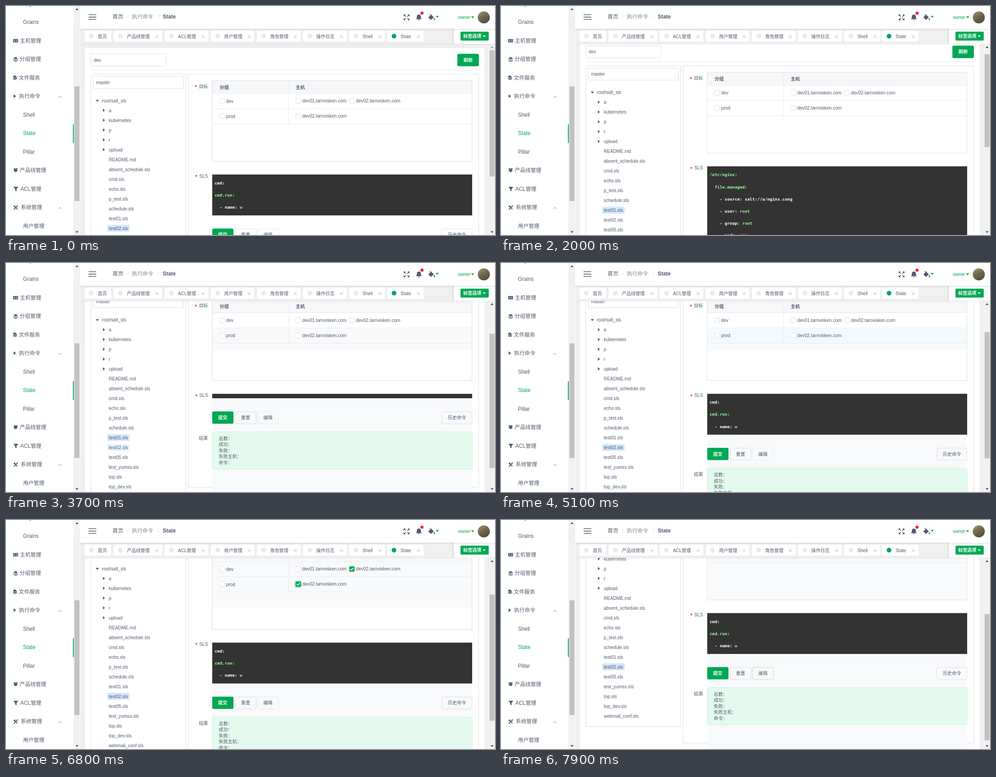
An HTML page for the animation above (8 s loop, 1092 px wide and 513 px high).

```html
<!DOCTYPE html>
<html lang="zh">
<head>
<meta charset="utf-8">
<style>
  html, body { margin: 0; width: 100%; height: 100%; overflow: hidden; background: #fff; }
  svg { display: block; }
  text { font: 10.2px "Liberation Sans", "Noto Sans CJK SC", "Noto Sans CJK", sans-serif; fill: #515a6e; white-space: pre; }
  .big { font-size: 11.9px; }
  .bold { font-weight: bold; }
  .code { font: bold 9.3px "DejaVu Sans Mono", monospace; }
</style>
</head>
<body>
<svg id="stage" width="1092" height="513">
  <defs>
    <linearGradient id="photo" x2=".6" y2="1">
      <stop offset="0" stop-color="#a39c80"/><stop offset=".5" stop-color="#746a4a"/><stop offset="1" stop-color="#4c5044"/>
    </linearGradient>
  </defs>
</svg>
<script>
const GREEN = '#00a854', INK = '#515a6e', LINE = '#dcdee2', SOFT = '#e8eaec', TINT = '#f8f9fb';
const LOOP = 8000, TICK = 100, VIEW_TOP = 85, VIEW_H = 428, EDITOR_TOP = 377.5, LINE_H = 27.2;

const set = (e, attrs) => { for (const k in attrs) e.setAttribute(k, attrs[k]); return e; };
const add = (parent, tag, attrs = {}) =>
  parent.appendChild(set(document.createElementNS('http://www.w3.org/2000/svg', tag), attrs));
const rect = (g, x, y, width, height, fill, more) => add(g, 'rect', { x, y, width, height, fill, ...more });
const frame = (g, x, y, w, h, fill = 'none', stroke = LINE, rx = 3, more) =>
  rect(g, x + .5, y + .5, w - 1, h - 1, fill, { stroke, rx, ...more });
const path = (g, d, fill = INK, more) => add(g, 'path', { d, fill, ...more });
const stroke = (g, d, color = INK, width = 1) => path(g, d, 'none', { stroke: color, 'stroke-width': width });
const circle = (g, cx, cy, r, fill) => add(g, 'circle', { cx, cy, r, fill });
// y is the vertical middle of the text
const text = (g, x, y, str, cls = '', fill, anchor = 'start') => {
  const e = add(g, 'text', { x, y: y + (cls.includes('big') ? 4.2 : 3.7), class: cls, 'text-anchor': anchor });
  if (fill) e.style.fill = fill;
  e.textContent = str;
  return e;
};
const caret = (g, x, y, fill, s = 3.5) => path(g, `M${x - s} ${y - s / 2}h${2 * s}l${-s} ${s * 1.2}z`, fill);
const show = (e, on) => e.setAttribute('display', on ? 'inline' : 'none');

const stage = document.getElementById('stage');
rect(stage, 0, 0, 1092, 513, '#f0f0f0');

// ---- scrolling pane
const port = add(stage, 'svg', { x: 166, y: VIEW_TOP, width: 912, height: VIEW_H, viewBox: `166 ${VIEW_TOP} 912 ${VIEW_H}` });
const pane = add(port, 'g');
const page = frame(pane, 175, 93, 895, 600, '#fff', SOFT);
frame(pane, 189, 107, 169, 28, '#fff');
text(pane, 196, 121, 'dev');
rect(pane, 1008, 107, 48, 28, GREEN, { rx: 3 });
text(pane, 1032, 121, '刷新', 'bold', '#fff', 'middle');
rect(pane, 189, 143, 867, 1, SOFT);
frame(pane, 189, 152, 213, 480);
const card = frame(pane, 406, 152, 650, 500);
frame(pane, 194, 157, 203, 28, '#fff');
text(pane, 201, 171, 'master');

// file tree
const hoverBox = rect(pane, 226, 0, 0, 15.5, '#eaf4fe', { rx: 2 });
const selBox = rect(pane, 226, 0, 0, 15.5, '#d5e8fc', { rx: 2 });
caret(pane, 204, 212, INK, 3.7);
text(pane, 214, 212, 'root/salt_sls');
const rows = {};
['a', 'kubernetes', 'p', 'r', 'upload', 'README.md', 'absent_schedule.sls', 'cmd.sls', 'echo.sls', 'p_test.sls',
  'schedule.sls', 'test01.sls', 'test02.sls', 'test05.sls', 'test_yumss.sls', 'top.sls', 'top_dev.sls', 'webmail_conf.sls'
].forEach((name, i) => {
  const y = 234 + i * 22;
  if (i < 5) path(pane, `M216.5 ${y - 4}v7.4l4.4-3.7z`);
  rows[name] = { y, label: text(pane, 229.5, y, name) };
});
const mark = (box, name) => {
  show(box, name);
  if (name) set(box, { y: rows[name].y - 8, width: rows[name].label.getComputedTextLength() + 7 });
};

// target table
const label = (g, y, str, starX) => {
  text(g, 451, y, str, '', INK, 'end');
  if (starX) text(g, starX, y + 2, '*', 'big bold', '#ed4014', 'middle');
};
label(pane, 180, '目标', 424);
rect(pane, 461, 167, 580, 29, '#f5f7f9');
const tableTint = rect(pane, 461, 230, 580, 0, TINT);
const rowHover = rect(pane, 461, 230, 580, 34, '#f3faff');
frame(pane, 460, 166.5, 581, 182, 'none', LINE, 0);
for (const y of [195.5, 229.5, 263.5]) rect(pane, 461, y, 580, 1, SOFT);
rect(pane, 630.5, 167, 1, 97, SOFT);
text(pane, 477, 182, '分组', 'bold');
text(pane, 647, 182, '主机', 'bold');
const checkbox = (x, y, str) => {
  frame(pane, x, y - 6, 12, 12, '#fff', LINE, 2);
  text(pane, x + 15, y, str);
  const on = add(pane, 'g');
  rect(on, x, y - 6, 12, 12, GREEN, { rx: 2 });
  stroke(on, `M${x + 2.8} ${y}l2.4 2.5l4.2-5`, '#fff', 1.6);
  return on;
};
const unused = [checkbox(476.5, 213, 'dev'), checkbox(646.5, 212.5, 'dev01.tarnvisken.com'), checkbox(476.5, 247, 'prod')];
unused.forEach(e => show(e, false));
const devCheck = checkbox(766.5, 212.5, 'dev02.tarnvisken.com');
const prodCheck = checkbox(646.5, 246.5, 'dev02.tarnvisken.com');
rect(prodCheck, 645.5, 239.5, 14, 14, 'none', { rx: 3, stroke: GREEN, 'stroke-opacity': .25, 'stroke-width': 2 });

// editor
label(pane, 381, 'SLS', 425);
const lowTint = rect(pane, 461, 380, 580, 600, TINT);
const editor = rect(pane, 460.5, EDITOR_TOP, 580.5, 10, '#333');
const LIME = '#98fb98', RED = '#cd5c5c';
const makeDoc = lines => {
  const g = add(pane, 'g');
  lines.forEach(([indent, key, color, value = '', valueColor], i) => {
    const x = 466 + indent * 5.6, y = EDITOR_TOP + 18.5 + i * LINE_H;
    text(g, x, y, key, 'code', color);
    const v = text(g, x + (key.length + 1) * 5.6, y, value, 'code', valueColor);
    if (valueColor === RED) v.style.fontWeight = 'normal';
  });
  return g;
};
const docs = {
  cmd: { lines: 3, g: makeDoc([[0, 'cmd:', '#fff'], [0, 'cmd.run:', LIME], [2, '- name:', '#fff', 'w', LIME]]) },
  nginx: { lines: 11, g: makeDoc([
    [0, '/etc/nginx:', LIME], [2, 'file.managed:', LIME],
    [4, '- source:', '#fff', 'salt://a/nginx.cong', '#fff'],
    [4, '- user:', '#fff', 'root', LIME], [4, '- group:', '#fff', 'root', LIME],
    [4, '- mode:', '#fff', '644', RED], [4, '- template:', '#fff', 'jinja', LIME]]) }
};

// buttons and result, measured from the editor's lower edge
const low = add(pane, 'g');
const button = (x, w, str, more) => [frame(low, x, 29.5, w, 28, 'none', LINE, 3, more), text(low, x + w / 2, 43.5, str, '', INK, 'middle')];
rect(low, 460.5, 29.5, 47.5, 27.5, GREEN, { rx: 3 });
text(low, 484, 43.5, '提交', 'bold', '#fff', 'middle');
button(511, 48, '重置');
const [editFrame, editText] = button(561, 48, '编辑', { 'stroke-dasharray': '3 2' });
button(973, 68, '历史命令');
label(low, 89, '结果');
frame(low, 460, 75, 581.5, 84, '#e5faee', '#c5f0d8', 4);
['总数：', '成功：', '失败：', '失败主机：', '命令：'].forEach((s, i) => text(low, 475, 90 + i * 13.5, s));

// ---- page scrollbar
const scrollbar = (x, top, bottom) => {
  rect(stage, x, top, 13, bottom - top, '#f1f1f1');
  path(stage, `M${x + 3} ${bottom - 8.5}h7l-3.5 4z`, '#505050');
  return [path(stage, `M${x + 3} ${top + 9}h7l-3.5-4z`, '#505050'), rect(stage, x + 1, 0, 11, 0, '#c1c1c1')];
};
const [upArrow, thumb] = scrollbar(1079, VIEW_TOP, 513);

// ---- header and tabs
rect(stage, 166, 51, 926, 34, '#f0f0f0');
rect(stage, 1000, 51, 92, 34, '#fff');
rect(stage, 166, 0, 926, 51, '#fff');
for (let i = 0; i < 4; i++) {
  const shade = { opacity: .08 - .02 * i };
  rect(stage, 166, 51 + i, 926, 1, '#000', shade);
  rect(stage, 166, 84 + i, 926, 1, '#000', { opacity: shade.opacity / 2 });
  rect(stage, 999 - i, 51, 1, 34, '#000', shade);
}
stroke(stage, 'M184.5 19.5h17M184.5 24.8h17M184.5 30h17', INK, 1.7);
text(stage, 238, 24, '首页', 'big');
text(stage, 271, 24, '/', 'big', LINE);
text(stage, 281, 24, '执行命令', 'big', '#808695');
text(stage, 339, 24, '/', 'big', LINE);
text(stage, 350, 24, 'State', 'big bold');
path(stage, 'M888 19h4.5l-4.5 4.5zM901 19v4.5l-4.5-4.5zM888 32v-4.5l4.5 4.5zM901 32h-4.5l4.5-4.5z');
stroke(stage, 'M889 20l4 4M900 20l-4 4M889 31l4-4M900 31l-4-4', INK, 1.5);
path(stage, 'M915.5 29.5q2-1.5 2-6q0-4 4.5-4.6q4.500 .6 4.500 4.600q0 4.500 2 6zM920 30.500h4q-2 3.500-4 0z');
circle(stage, 929, 16, 3.5, '#f5222d');
path(stage, 'M943 25.500l6.500-6l6 6l-6.500 5.500zM956.500 27q3 4 0 5q-3-1 0-5z');
stroke(stage, 'M946.500 18l4 4', INK, 1.4);
caret(stage, 963, 24, GREEN);
text(stage, 1009, 25.500, 'owner', '', GREEN);
caret(stage, 1042, 25, GREEN);
circle(stage, 1067, 25.5, 13.5, 'url(#photo)');

[['首页', 174, 62], ['产品线管理', 239, 111], ['ACL管理', 353, 100], ['用户管理', 456, 100], ['角色管理', 559, 100],
  ['操作日志', 662, 100], ['Shell', 765, 83], ['State', 850, 84]].forEach(([name, x, w], i) => {
  frame(stage, x, 54, w, 27, '#fff', SOFT, 2);
  circle(stage, x + 16.500, 67.500, 5.200, name === 'State' ? GREEN : SOFT);
  text(stage, x + 31, 68, name);
  if (i) stroke(stage, `M${x + w - 16} 65.500l6 6m0-6l-6 6`, '#a0a5b0', .9);
});
rect(stage, 1015, 57.500, 63, 20, GREEN, { rx: 2 });
text(stage, 1021, 67.500, '标签选项', 'bold', '#fff');
caret(stage, 1068, 67.500, '#fff', 3.2);

// ---- sidebar
rect(stage, 0, 0, 152, 513, '#fff');
rect(stage, 151, 0, 1, 513, SOFT);
const sideThumb = scrollbar(152, 0, 513)[1];
set(sideThumb, { y: 180, height: 257 });
rect(stage, 165, 0, 1, 513, '#f8f8f8');
[['Key', 38], ['Grains', 38], ['主机管理', 31], ['分组管理', 30.500], ['文件服务', 28.500], ['执行命令', 29], ['Shell', 38],
  ['State', 38], ['Pillar', 38], ['产品线管理', 30.500], ['ACL管理', 32], ['系统管理', 33], ['用户管理', 38]].forEach(([name, x], i) =>
  text(stage, x, -5.300 + i * 41.500, name, 'big', name === 'State' ? GREEN : INK));
rect(stage, 149.500, 265, 2, 42, GREEN);
path(stage, 'M16 74h11v7.500h-11z');
stroke(stage, 'M17.500 76.500h3M17.500 79h3M22.500 76.500h3M22.500 79h3', '#fff', .9);
path(stage, 'M16.500 117l5-2.800l5 2.800l-5 2.800z');
stroke(stage, 'M16.500 119.500l5 2.600l5-2.600M16.500 122l5 2.600l5-2.600', INK, 1.2);
path(stage, 'M16.500 156h4.500l2.700 2.700v6.300h-7.200z');
stroke(stage, 'M18 160.500h4M18 162.700h4', '#fff', .8);
path(stage, 'M17 198v8l5.500-4z');
path(stage, 'M16.500 365l2.700-2l2.300 1.700l2.300-1.700l2.700 2l-2.500 2l2.500 1.800l-5 3.700l-5-3.700l2.500-1.800z');
path(stage, 'M16.500 405h11l-4 5.200v5l-3-2v-3z');
stroke(stage, 'M17.500 456l7.500-7.500M18.500 448.500l7 7', INK, 1.8);
path(stage, 'M16.500 449l3-2.500l2 2l-3 2.500zM23.500 447.500l2.500-1.500l.5 2.500l-2 1.500z');
stroke(stage, 'M117 205.500l3.700-3.500l3.700 3.500M117 454.500l3.700-3.500l3.700 3.500', '#808695');

// ---- timeline
const ease = (t, from, to) => { const x = Math.min(1, Math.max(0, (t - from) / (to - from))); return x * x * (3 - 2 * x); };
const within = (t, a, b) => t >= a && t < b;

function draw(now) {
  const t = Math.floor(now % LOOP / TICK) * TICK;
  const scroll = 84.5 * (ease(t, 1914, 2200) + ease(t, 6714, 7000));
  const doc = within(t, 1400, 2000) || within(t, 3700, 3900) ? null : within(t, 2000, 3700) ? 'nginx' : 'cmd';
  const editorH = 10 + (doc ? docs[doc].lines * LINE_H : 0);
  const cardEnd = EDITOR_TOP + editorH + 199.5;
  const pageEnd = Math.max(632, cardEnd) + 14;

  set(pane, { transform: `translate(0 ${-scroll})` });
  set(page, { height: pageEnd - 93 });
  set(card, { height: cardEnd - 152 });
  set(editor, { height: editorH });
  set(low, { transform: `translate(0 ${EDITOR_TOP + editorH})` });
  for (const k in docs) show(docs[k].g, k === doc);

  show(lowTint, t >= 1400);
  const tintTop = t >= 6800 ? VIEW_TOP + scroll : 230;
  show(tableTint, t >= 2000);
  set(tableTint, { y: tintTop, height: Math.max(0, Math.min(196 + scroll, 348) - tintTop) });

  mark(selBox, within(t, 1500, 3800) ? 'test01.sls' : 'test02.sls');
  mark(hoverBox, within(t, 700, 900) ? 'schedule.sls' : within(t, 900, 1500) ? 'test01.sls'
    : within(t, 2500, 3000) ? 'test_yumss.sls' : within(t, 3200, 3800) ? 'test02.sls' : '');
  show(rowHover, within(t, 5100, 6500));
  show(devCheck, t >= 5900);
  show(prodCheck, t >= 6100);
  set(editFrame, { stroke: t >= 7900 ? '#9fc4b4' : LINE });
  editText.style.fill = t >= 7900 ? '#45705f' : INK;

  const ratio = 401 / (pageEnd + 9 - VIEW_TOP);
  set(thumb, { y: 99 + scroll * ratio, height: VIEW_H * ratio });
  set(upArrow, { fill: scroll ? '#505050' : '#a3a3a3' });
}

const start = performance.now();
function loop() {
  draw(performance.now() - start);
  requestAnimationFrame(loop);
}
loop();
</script>
</body>
</html>
```
